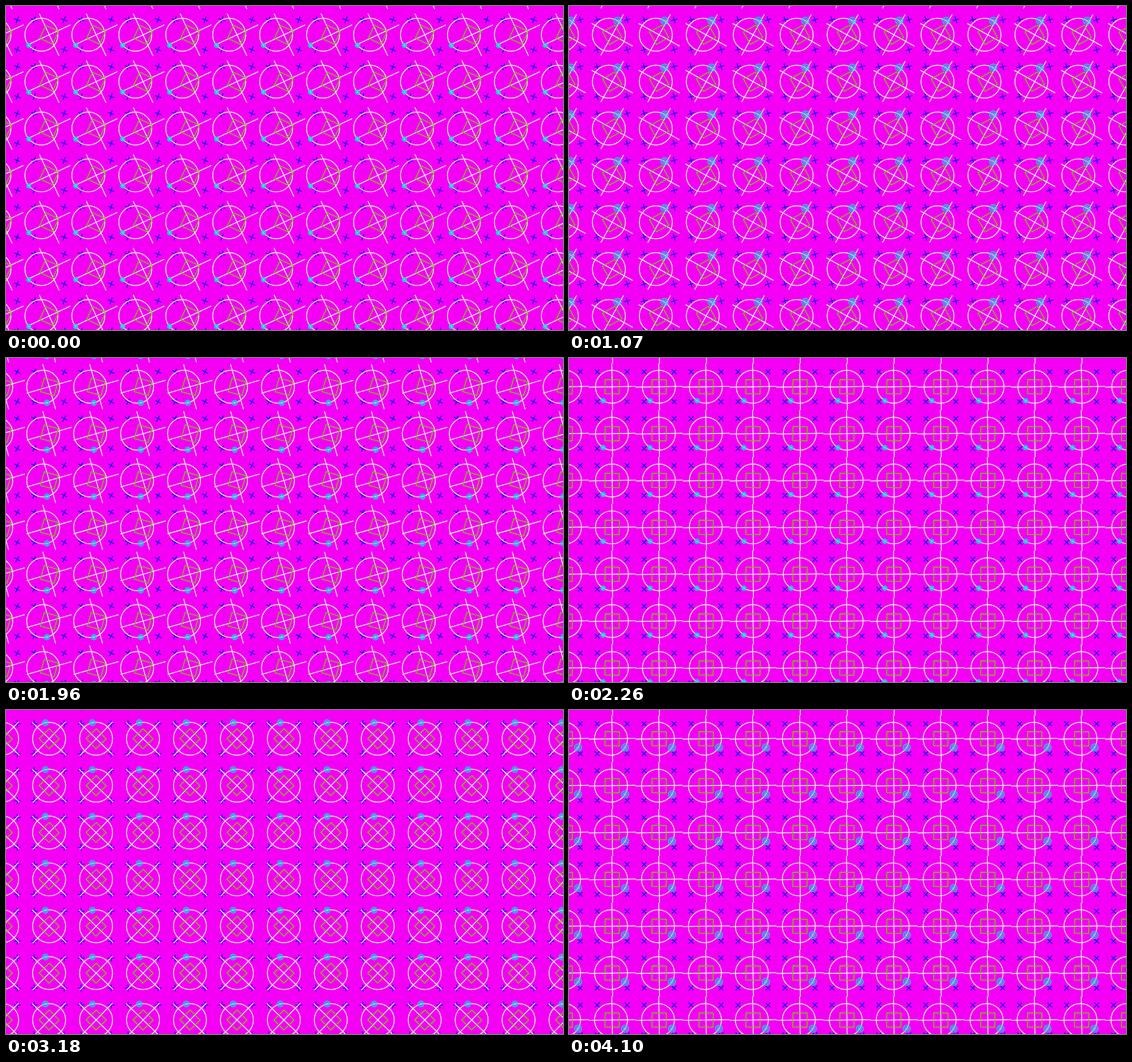
An HTML page with a canvas for the animation above (4.2 s loop, 980x571 px).

```html
<!DOCTYPE html>
<html lang="en">
<head>
<meta charset="utf-8">
<title>Turning tiles</title>
<style>
  html, body { margin: 0; width: 100%; height: 100%; overflow: hidden; background: #f300f5; }
  canvas { display: block; }
</style>
</head>
<body>
<canvas id="stage" width="980" height="571"></canvas>
<script>
const ctx = document.getElementById('stage').getContext('2d');
const LOOP = 4200, TILE = 82.6, ORIGIN_X = 76, ORIGIN_Y = 50.7;
const RING = 29, CORNER = 26.4;

// Start of each held pose, in ms.
const steps = [0, 180, 470, 770, 1070, 1370, 1660, 1960, 2260, 2560, 2850, 3180, 3470, 3770, 4100];
const rad = deg => deg * Math.PI / 180;

// Every part turns at its own constant rate; the beat starts slightly slow.
function poseAt(step) {
  const beat = step + 0.4 * Math.max(0, 1 - step / 4);
  const turn = 15 * beat - 31;
  const bead = 5 - 1.4 * Math.cos(rad(41 * beat));
  return {
    angle: rad(turn),
    orbit: rad(3 * turn + 215),
    ringX: -10 + 10 * Math.cos(rad(249.2 * beat + 148.6)),
    bead,
    core: bead / 2
  };
}

function stroke(color, width, build) {
  ctx.beginPath();
  build();
  ctx.strokeStyle = color;
  ctx.lineWidth = width;
  ctx.stroke();
}

function cross(x, y, reach, angle) {
  const c = Math.cos(angle) * reach, s = Math.sin(angle) * reach;
  ctx.moveTo(x - c, y - s);
  ctx.lineTo(x + c, y + s);
  ctx.moveTo(x + s, y - c);
  ctx.lineTo(x - s, y + c);
}

function square(half, angle) {
  for (let i = 0; i < 4; i++) {
    const a = angle + Math.PI / 4 + i * Math.PI / 2;
    ctx.lineTo(Math.cos(a) * half * Math.SQRT2, Math.sin(a) * half * Math.SQRT2);
  }
  ctx.closePath();
}

function circle(x, y, r) {
  ctx.moveTo(x + r, y);
  ctx.arc(x, y, r, 0, Math.PI * 2);
}

function drawTile({ angle, orbit, ringX, bead, core }) {
  const beadX = ringX + RING * Math.cos(orbit), beadY = RING * Math.sin(orbit);

  stroke('#1a08e8', 1.6, () => {
    for (const x of [-CORNER, CORNER])
      for (const y of [-CORNER, CORNER]) cross(x, y, 6, angle + Math.PI / 4);
  });
  stroke('#e4f2e0', 1.6, () => cross(0, 0, TILE / 2, angle));
  stroke('#e8e8c8', 1.7, () => circle(ringX, 0, RING));
  stroke('#7fb81a', 1.8, () => square(12.5, -angle));
  stroke('#08dce0', 1.6, () => {
    circle(beadX, beadY, bead);
    circle(beadX, beadY, core);
  });
}

function render(now) {
  const time = now % LOOP;
  const pose = poseAt(steps.findLastIndex(start => time >= start));

  ctx.fillStyle = '#f300f5';
  ctx.fillRect(0, 0, 980, 571);
  for (let row = -1; row <= 7; row++) {
    for (let col = -1; col <= 11; col++) {
      ctx.save();
      ctx.translate(ORIGIN_X + col * TILE, ORIGIN_Y + row * TILE);
      drawTile(pose);
      ctx.restore();
    }
  }
}

const begin = performance.now();
function tick() {
  render(performance.now() - begin);
  requestAnimationFrame(tick);
}
tick();
</script>
</body>
</html>
```
